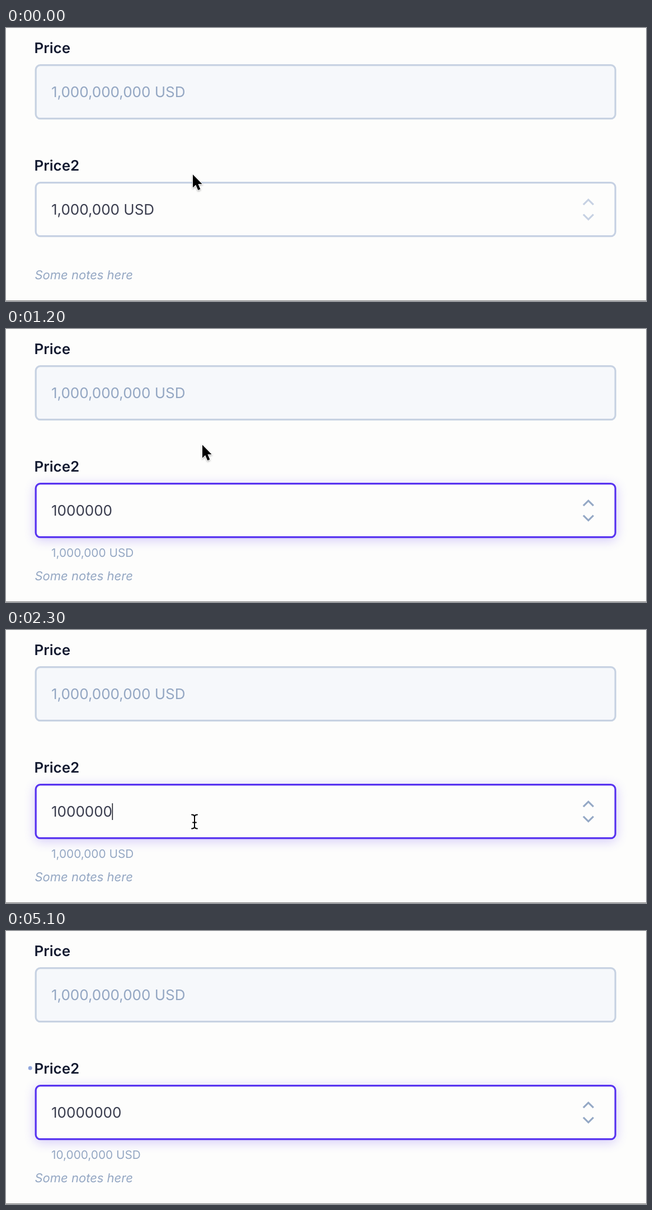
Animation, 1144 px wide and 490 px high, one loop 5.2 s. Source, as an HTML page:

```html
<!DOCTYPE html>
<html lang="en">
<head>
<meta charset="utf-8">
<title>Price fields</title>
<style>
  html, body { margin: 0; width: 100%; height: 100%; overflow: hidden; background: #fdfdfc; }
  svg { display: block; width: 1144px; height: 490px; }
  text {
    font-family: Inter, "Open Sans", sans-serif;
    font-size: 26px;
    font-optical-sizing: none;
    text-rendering: geometricPrecision;
    white-space: pre;
  }
  .label { font-weight: 600; fill: #131a30; }
  .value { fill: #3c3f50; }
  .muted { fill: #94a7c3; }
  .hint { font-size: 20.8px; }
  .notes { font-size: 22px; font-style: italic; }
  .field { stroke-width: 3.2; }
  .chevron { fill: none; stroke-width: 3.2; }
</style>
</head>
<body>
<svg viewBox="0 0 1144 490">
  <defs>
    <filter id="blur" x="-10%" y="-60%" width="120%" height="220%">
      <feGaussianBlur stdDeviation="10"/>
    </filter>
    <filter id="soft" x="-50%" y="-50%" width="200%" height="200%">
      <feDropShadow dx="0" dy="1.5" stdDeviation="1.5" flood-color="#000" flood-opacity=".35"/>
    </filter>
  </defs>
  <rect width="1144" height="490" fill="#fdfdfc"/>

  <text class="label" x="50.5" y="45">Price</text>
  <rect class="field" x="53.2" y="66.7" width="1036" height="96" rx="8" fill="#f6f8fb" stroke="#c7d2e2"/>
  <text class="muted" x="81" y="124">1,000,000,000 USD</text>

  <rect id="glow" x="52" y="280" width="1039" height="99" rx="9" fill="#5733f0" filter="url(#blur)"/>
  <circle id="dot" cx="43.2" cy="246" r="3.5" fill="#8fa5dc"/>
  <text class="label" x="50.5" y="256">Price2</text>
  <rect id="field" class="field" x="53.2" y="277.7" width="1036" height="96" rx="8" fill="#fdfdfc"/>
  <text id="value" class="value" x="81" y="335"></text>
  <rect id="caret" y="311" width="1.6" height="30" fill="#22242e"/>
  <path id="chevrons" class="chevron" d="M1032 317.2l9-9 9 9M1032 334.6l9 9 9-9"/>
  <text id="hint" class="muted hint" x="81" y="409"></text>
  <text class="muted notes" x="51.5" y="451">Some notes here</text>
  <rect y="489" width="1144" height="1" fill="#777"/>

  <path id="arrow" d="M0 0V23.4L5.2 18.6 9.3 28 13.4 26.2 9.4 17H16.6Z"
        fill="#000" stroke="#fff" stroke-width="1.6" paint-order="stroke" filter="url(#soft)"/>
  <g id="beam" fill="none" stroke-linecap="round">
    <path d="M-5-12.5Q0-12.5 0-8.5Q0-12.5 5-12.5M0-8.5V8.5M-5 12.5Q0 12.5 0 8.5Q0 12.5 5 12.5M-3 1.5H3" stroke="#fff" stroke-width="4"/>
    <path d="M-5-12.5Q0-12.5 0-8.5Q0-12.5 5-12.5M0-8.5V8.5M-5 12.5Q0 12.5 0 8.5Q0 12.5 5 12.5M-3 1.5H3" stroke="#000" stroke-width="2"/>
  </g>
</svg>
<script>
  const LOOP = 5200, STEP = 100, FADE = 200;
  const REST = [198, 209, 227], HOVER = [148, 168, 207], FOCUS = [87, 51, 240], CHEVRON = [148, 168, 197];

  // time, x, y of the mouse hotspot
  const mouse = [
    [0, 334, 263], [100, 335, 275], [300, 338, 308], [500, 339, 322], [800, 339, 323],
    [1000, 343, 270], [1200, 351, 208], [1400, 352, 203], [1500, 350, 225], [1600, 344, 278],
    [1700, 340, 313], [1900, 337, 344], [2500, 337, 344], [3000, 338, 420], [3500, 340, 515]
  ];
  const focused = [[700, 1300], [1900, LOOP + FADE]];
  const hovered = [[100, 1000], [1630, 2700]];
  const caretOn = [[700, 1200], [1900, 2400], [2900, 3400], [3900, 4900]];
  const TYPED = 4400;

  const el = Object.fromEntries([...document.querySelectorAll("svg [id]")].map(n => [n.id, n]));
  const clamp = v => Math.max(0, Math.min(1, v));
  const inside = (spans, t) => spans.some(([a, b]) => t >= a && t < b);
  const smooth = v => v * v * (3 - 2 * v);
  const fade = (spans, t) => Math.max(...spans.map(([a, b]) =>
    smooth(clamp(Math.min((t - a) / FADE, 1 - (t - b) / FADE)))));
  const mix = (a, b, k) => a.map((v, i) => v + (b[i] - v) * k);
  const css = c => `rgb(${c.map(Math.round)})`;
  const show = (node, on) => node.setAttribute("visibility", on ? "visible" : "hidden");
  const write = (node, s) => { if (node.textContent !== s) node.textContent = s; };

  function mouseAt(t) {
    const i = mouse.findIndex(p => p[0] > t);
    if (i < 0) return mouse.at(-1).slice(1);
    const a = mouse[i - 1], b = mouse[i];
    return mix(a, b, (t - a[0]) / (b[0] - a[0])).slice(1);
  }

  function draw(t) {
    const active = inside(focused, t);
    const focus = fade(focused, t), hover = fade(hovered, t);
    const amount = t >= TYPED ? 10000000 : 1000000;
    const pretty = amount.toLocaleString("en-US") + " USD";

    write(el.value, active ? String(amount) : pretty);
    write(el.hint, pretty);
    show(el.hint, active);
    el.field.setAttribute("stroke", css(mix(mix(REST, HOVER, hover), FOCUS, focus)));
    el.chevrons.setAttribute("stroke", css(mix(REST, CHEVRON, Math.max(hover, focus))));
    el.glow.setAttribute("opacity", 0.25 * focus);
    el.dot.setAttribute("opacity", clamp((t - TYPED) / FADE));

    const caret = inside(caretOn, t);
    show(el.caret, caret);
    if (caret) el.caret.setAttribute("x", 80.5 + el.value.getComputedTextLength());

    const [x, y] = mouseAt(t);
    const over = y > 276 && y < 375;
    for (const [node, on] of [[el.arrow, !over], [el.beam, over]]) {
      show(node, on && y < 500);
      node.setAttribute("transform", `translate(${x} ${y})`);
    }
  }

  const start = performance.now();
  function tick() {
    const t = (performance.now() - start) % LOOP;
    draw(Math.floor(t / STEP) * STEP);
    requestAnimationFrame(tick);
  }
  tick();
</script>
</body>
</html>
```
